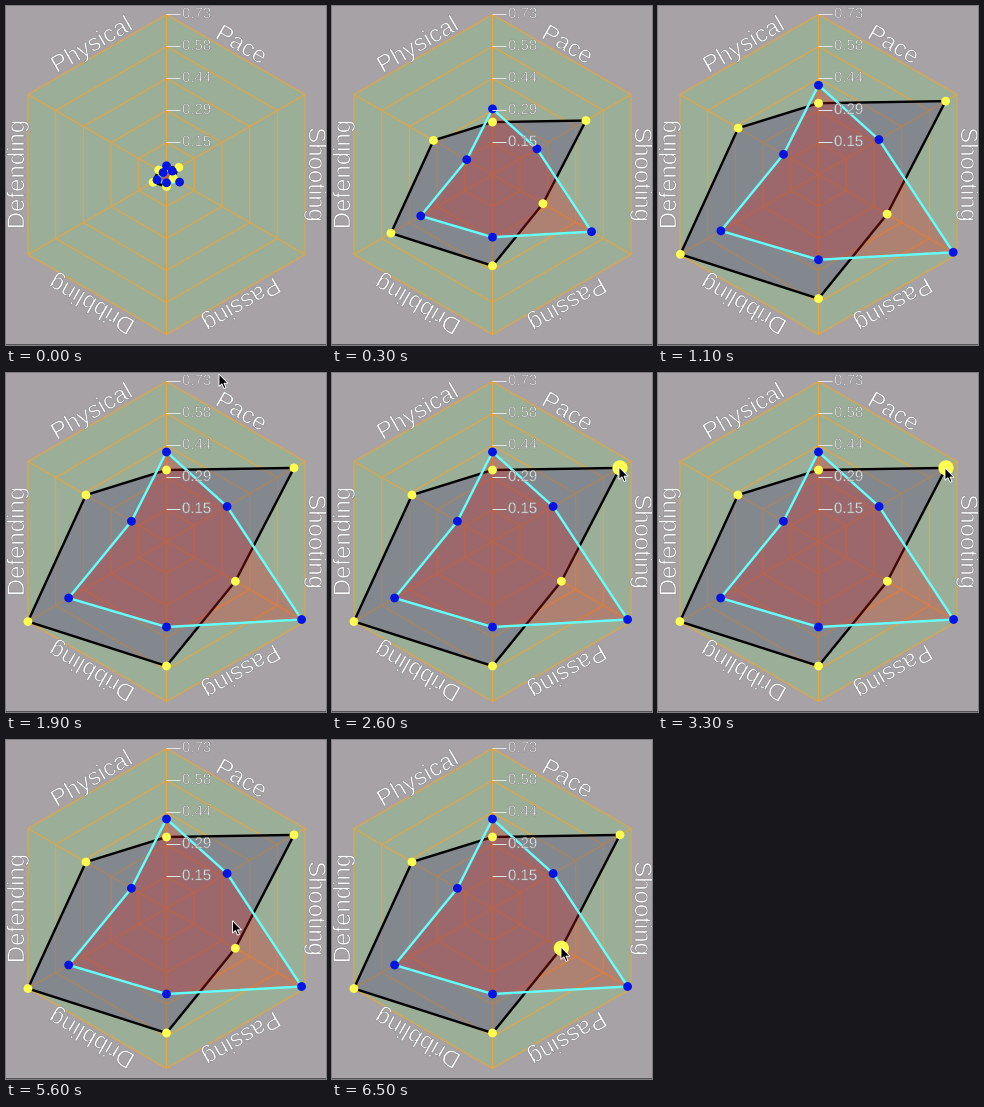
Write a matplotlib script that moves like this. It is 320x339 px and loops after 6.6 s.

```python
import numpy as np
import matplotlib.pyplot as plt
from matplotlib.animation import FuncAnimation
from matplotlib.patches import Circle, Polygon
from matplotlib.patheffects import Stroke

W, H, DPI = 320, 339, 100
FRAMES, STEP = 66, 100
PX = 72 / DPI
CX, CY, R = 160.5, 168.5, 160

LABELS = ["Pace", "Shooting", "Passing", "Dribbling", "Defending", "Physical"]
TICKS = ["0.15", "0.29", "0.44", "0.58", "0.73"]
ANGLES = np.radians(np.arange(0, 360, 60))
GRID = dict(color="#e4a543", lw=1.2 * PX, zorder=1, snap=False)

# Radii in pixels, clockwise from the top
DARK = np.array([71.5, 147.2, 79.5, 124.5, 160, 93])
CYAN = np.array([89.5, 70, 156, 85.5, 113, 40.5])
DOT, BIG_DOT = 4.4, 7.6

# Pointer stops: time, x, y
PATH = np.array([
    [1800, 203, -18], [1900, 213, 1], [2600, 287, 94], [3500, 287, 95],
    [4300, 222, 134], [5000, 222, 134], [6000, 229, 206], [6600, 229, 207],
])
ARROW = np.array([[0, 0], [0, 12.5], [2.9, 9.8], [5, 14.5],
                  [7, 13.6], [5, 9.2], [9, 9.2]])


def polar(radius, angle=ANGLES):
    return np.column_stack([CX + radius * np.sin(angle),
                            CY - radius * np.cos(angle)])


def growth(ms):
    return 1 - max(0, 0.9881 - 0.00044 * ms) ** 8.5


def pulse(ms, start, end, fade=150):
    """Ramp up to 1 after start and back to 0 at end."""
    return float(np.clip(min((ms - start) / fade, (end - ms) / fade), 0, 1))


def pointer(ms):
    i = np.clip(np.searchsorted(PATH[:, 0], ms, side="right") - 1,
                0, len(PATH) - 2)
    a, b = PATH[i], PATH[i + 1]
    u = np.clip((ms - a[0]) / (b[0] - a[0]), 0, 1)
    u = u * u * (3 - 2 * u)
    return a[1:] + (b[1:] - a[1:]) * u


fig = plt.figure(figsize=(W / DPI, H / DPI), dpi=DPI, facecolor="#a6a2a6")
ax = fig.add_axes([0, 0, 1, 1])
ax.set(xlim=(0, W), ylim=(H, 0))
ax.axis("off")


def shape(points, z, **style):
    return ax.add_patch(Polygon(points, zorder=z, **style))


def write(x, y, text, size, **style):
    outline = [Stroke(linewidth=0.6 * PX, foreground="#8a8a8a")]
    ax.text(x, y, text, color="white", fontsize=size * PX, zorder=6,
            family="Liberation Sans", path_effects=outline, **style)


# Backdrop and grid
shape(polar(R), 0, fc="#9bae98", ec="none")
for k in range(1, 6):
    ring_points = polar(R * k / 5)
    ax.plot(*np.vstack([ring_points, ring_points[:1]]).T, **GRID)
for x, y in polar(R):
    ax.plot([CX, x], [CY, y], **GRID)
ax.plot([0, W], [338.5, 338.5], color="#555355", lw=PX, snap=False)

# Labels
for k, text in enumerate(TICKS, 1):
    y = CY - R * k / 5
    ax.plot([161, 174], [y, y], color="#e4e4e4", lw=PX, zorder=6, snap=False)
    write(176, y + 3.5, text, 15, va="baseline")
for deg, text in zip(range(30, 390, 60), LABELS):
    x, y = polar(142.5, np.radians([deg]))[0]
    write(x, y, text, 24, rotation=-deg, rotation_mode="anchor",
          ha="center", va="baseline")


class Series:
    def __init__(self, radii, fill, alpha, line, dot, z):
        self.radii = radii
        points = polar(radii)
        self.area = shape(points, z, fc=fill, alpha=alpha, lw=0)
        self.edge = shape(points, z + 0.1, fill=False, ec=line, lw=2.4 * PX,
                          joinstyle="round")
        self.dots = [ax.add_patch(Circle(p, DOT, fc=dot, ec="none",
                                         zorder=z + 2)) for p in points]

    def scale(self, k):
        points = polar(self.radii * k)
        self.area.set_xy(points)
        self.edge.set_xy(points)
        for dot, p in zip(self.dots, points):
            dot.center = p

    def swell(self, i, amount):
        self.dots[i].set_radius(DOT + (BIG_DOT - DOT) * amount)


dark = Series(DARK, "#5f507f", 0.4, "black", "#ffff50", 2)
cyan = Series(CYAN, "#dc1f1b", 0.3, "#64ffff", "#0014e6", 3)
ring = ax.add_patch(Circle((222, 135.2), 18.3, fill=False, ec="black",
                           lw=1.3 * PX, zorder=7))
arrow = shape(ARROW, 8, fc="black", ec="white", lw=0.9 * PX)


def draw(i):
    ms = i * STEP
    k = growth(ms)
    dark.scale(k)
    cyan.scale(k)
    dark.swell(1, pulse(ms, 2450, 5400))
    dark.swell(2, pulse(ms, 5850, 9000))
    grow = pulse(ms, 4200, 5300)
    ring.set_visible(grow > 0)
    ring.set_radius(18.3 * grow)
    arrow.set_visible(ms >= 1800)
    arrow.set_xy(ARROW + pointer(ms))
    return []


anim = FuncAnimation(fig, draw, frames=FRAMES, interval=STEP,
                     init_func=lambda: draw(0), repeat=True, repeat_delay=0)
plt.show()
```
